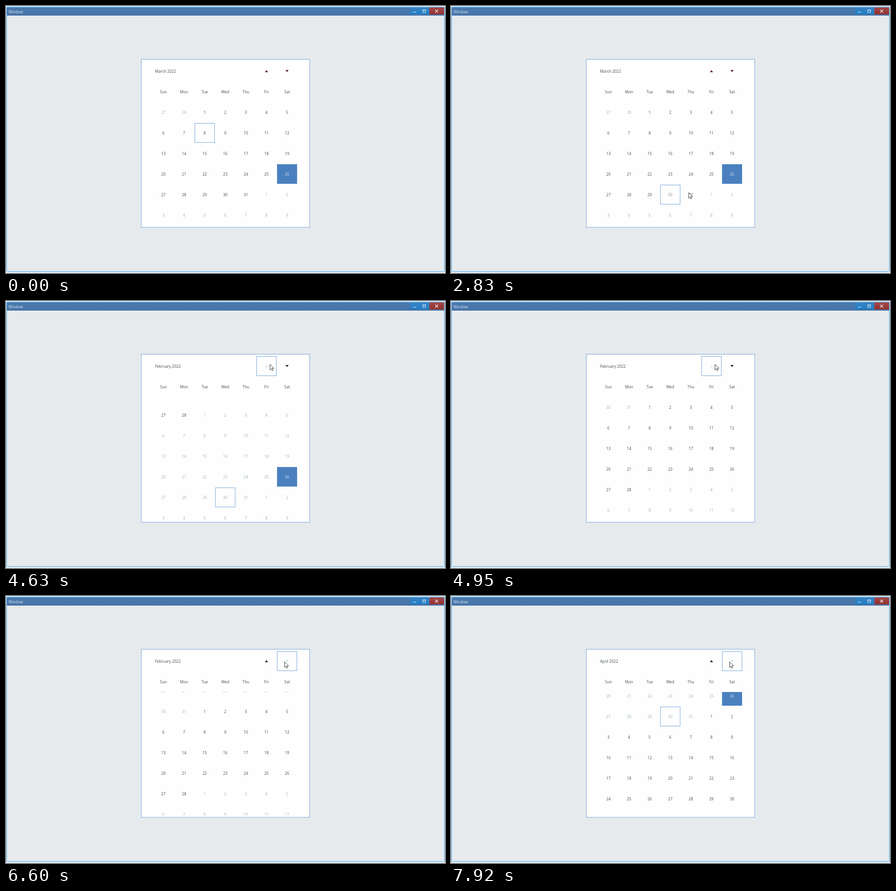
An HTML page for the animation above (8000 ms loop, 959 px wide and 584 px high).

```html
<!DOCTYPE html>
<html lang="en">
<head>
<meta charset="utf-8">
<title>Calendar</title>
<style>
  html, body { margin: 0; width: 100%; height: 100%; overflow: hidden; background: #e9f2f9; }
  svg { display: block; width: 959px; height: 584px; }
  text { font: 8.4px "Open Sans", "Noto Sans", sans-serif; fill: #414d50; }
  .mid { text-anchor: middle; }
  .box { fill: none; stroke: #74a6d9; width: 43px; height: 42px; }
  .chosen { fill: #4b80bf; stroke: #5a8dc8; }
  .other { fill: #9db6b3; }
  .hover { fill: #87928f; }
  .picked { fill: #d3e2ee; }
</style>
</head>
<body>
<svg viewBox="0 0 959 584">
  <defs>
    <clipPath id="view"><rect x="296" y="210" width="367" height="270"/></clipPath>
    <linearGradient id="bar" x2="0" y2="1"><stop stop-color="#4b79ae"/><stop offset="1" stop-color="#4774a8"/></linearGradient>
    <linearGradient id="blue" x2="0" y2="1"><stop stop-color="#3a83c3"/><stop offset="1" stop-color="#1f7fc6"/></linearGradient>
    <linearGradient id="red" x2="0" y2="1"><stop stop-color="#a2494a"/><stop offset="1" stop-color="#93302f"/></linearGradient>
  </defs>
  <rect x=".5" y="1.5" width="958" height="580" rx="2" fill="none" stroke="#b5daf3"/>
  <rect x="1.5" y="2.5" width="956" height="578" rx="1" fill="#e6eaed" stroke="#62b0e6"/>
  <rect x="2" y="3" width="955" height="18" fill="url(#bar)"/>
  <text x="5.5" y="16" style="fill:#dce5ee">Window</text>
  <rect x="883" y="3" width="20" height="15" fill="url(#blue)"/>
  <rect x="903.5" y="3" width="20.5" height="15" fill="url(#blue)"/>
  <rect x="925" y="3" width="32" height="15.5" fill="url(#red)"/>
  <g fill="none" stroke="#f2f5f8">
    <path d="M889 13.5h7M910.500 9h6v5h-6zM910 8.500h7"/>
    <path d="M937.500 8l6.500 6.500M944 8l-6.500 6.500" stroke-width="1.100"/>
  </g>
  <rect x="295.5" y="116.5" width="368" height="367.500" fill="#fefefe" stroke="#74a6d9"/>
  <text id="title" x="325.5" y="146"></text>
  <g id="heads"></g>
  <path id="up" d="M565.500 144.700h7l-3.500-4.500z"/>
  <path id="down" d="M610.500 140h7l-3.500 4.500z"/>
  <g clip-path="url(#view)"><g id="weeks"></g></g>
  <rect id="hoverBox" class="box"/>
  <path id="cursor" d="M.5 .5v12.200l2.800-2.700 1.900 4.300 1.900-.8-1.900-4.200h4z" fill="#fff" stroke="#222" stroke-width=".9"/>
</svg>
<script>
const LOOP = 8000, TICK = 78.4, TICK_LEAD = 14, SLIDE = 400, HOVER_LAG = 40;
const PITCH = 45, DAY = 864e5, FIRST_SUNDAY = Date.UTC(2021, 11, 26);

// Pointer moves in cell units: start, duration, column, row (the buttons are in row -2)
const ENTRY = { col: 13.4, row: -1.15 };
const MOVES = [
  [390, 240, 5.95, .95], [950, 460, 4.07, .95], [1730, 30, 4.03, 3.15],
  [1870, 400, 2.13, 3.7], [2360, 220, 3.02, 3.85], [2760, 390, 8.4, 4.05],
  [3585, 335, 5.8, -2.25], [4250, 160, 5.16, -2.11], [5920, 260, 5.87, -1.99],
].map(([start, take, col, row]) => ({ start, take, col, row }));

const pageTurns = [[4545, -1], [5425, -1], [6263, 1], [6895, 1], [7627, 1]];
const focusDay = t => dayIndex(2, t < 1480 ? 8 : t < 2740 ? 10 : 30);

const $ = id => document.getElementById(id);
const clamp = v => Math.max(0, Math.min(1, v));
const mix = (a, b, k) => a + (b - a) * k;
const colX = col => 344 + PITCH * col;
const rowY = row => 233 + PITCH * row;
const dayIndex = (month, day) => (Date.UTC(2022, month, day) - FIRST_SUNDAY) / DAY;
const firstWeek = month => Math.floor(dayIndex(month, 1) / 7);

function add(parent, tag, attrs, label = "") {
  const el = document.createElementNS("http://www.w3.org/2000/svg", tag);
  for (const key in attrs) el.setAttribute(key, attrs[key]);
  el.textContent = label;
  return parent.appendChild(el);
}

function place(el, x, y) {
  el.setAttribute("transform", `translate(${x} ${y})`);
}

function placeBox(el, col, row) {
  place(el, colX(col) - 21.5, rowY(row) - 21.5);
}

const placeOnDay = (el, i) => placeBox(el, i % 7, Math.floor(i / 7));

["Sun", "Mon", "Tue", "Wed", "Thu", "Fri", "Sat"].forEach((name, col) =>
  add($("heads"), "text", { class: "mid", x: colX(col), y: 191 }, name));

const picked = dayIndex(2, 26);
placeOnDay(add($("weeks"), "rect", { class: "box chosen" }), picked);
const focusBox = add($("weeks"), "rect", { class: "box" });
const days = Array.from({ length: 140 }, (_, i) => {
  const date = new Date(FIRST_SUNDAY + i * DAY);
  const el = add($("weeks"), "text",
    { x: colX(i % 7), y: rowY(Math.floor(i / 7)) + 3 }, date.getUTCDate());
  return { el, month: date.getUTCFullYear() === 2022 ? date.getUTCMonth() : -1 };
});

function pointer(t) {
  if (t < MOVES[0].start) return null;
  let { col, row } = ENTRY;
  for (const move of MOVES) {
    const k = clamp((t - move.start) / move.take);
    col = mix(col, move.col, k);
    row = mix(row, move.row, k);
  }
  return { col, row };
}

function cellUnder(tip) {
  if (!tip) return null;
  const col = Math.round(tip.col), row = Math.round(tip.row);
  const reach = 22 / PITCH;
  const inside = Math.abs(tip.col - col) < reach && Math.abs(tip.row - row) < reach;
  const isDay = row >= 0 && row < 6 && col >= 0 && col < 7;
  const isButton = row === -2 && (col === 5 || col === 6);
  return inside && (isDay || isButton) ? { col, row } : null;
}

function calendar(t) {
  let month = 2, scroll = firstWeek(month);
  for (const [start, step] of pageTurns) {
    if (t < start) break;
    const eased = (1 - Math.cos(Math.PI * clamp((t - start) / SLIDE))) / 2;
    month += step;
    scroll = mix(scroll, firstWeek(month), eased);
  }
  return { month, scroll };
}

function draw(t) {
  const { month, scroll } = calendar(t);
  const tip = pointer(t), cell = cellUnder(pointer(t - HOVER_LAG));
  const hovered = cell && cell.row >= 0 ? (Math.round(scroll) + cell.row) * 7 + cell.col : -1;
  const button = cell && cell.row < 0 ? cell.col : -1;

  $("title").textContent = ["January", "February", "March", "April"][month] + " 2022";
  place($("weeks"), 0, -Math.round(scroll * PITCH));
  placeOnDay(focusBox, focusDay(t));
  days.forEach((day, i) => {
    const look = i === picked ? "picked" : i === hovered ? "hover" : day.month !== month ? "other" : "";
    day.el.setAttribute("class", "mid " + look);
  });

  const idle = t < 4200 ? "#5a2229" : "#222";
  $("up").setAttribute("fill", button === 5 ? "#dde3e4" : idle);
  $("down").setAttribute("fill", button === 6 ? "#c4e6ec" : idle);

  $("hoverBox").style.display = cell ? "" : "none";
  if (cell) placeBox($("hoverBox"), cell.col, cell.row);
  $("cursor").style.display = tip ? "" : "none";
  if (tip) place($("cursor"), colX(tip.col), rowY(tip.row));
}

const began = performance.now();
function frame() {
  const t = (performance.now() - began) % LOOP;
  draw(Math.floor((t + TICK_LEAD) / TICK) * TICK);
  requestAnimationFrame(frame);
}
frame();
</script>
</body>
</html>
```
